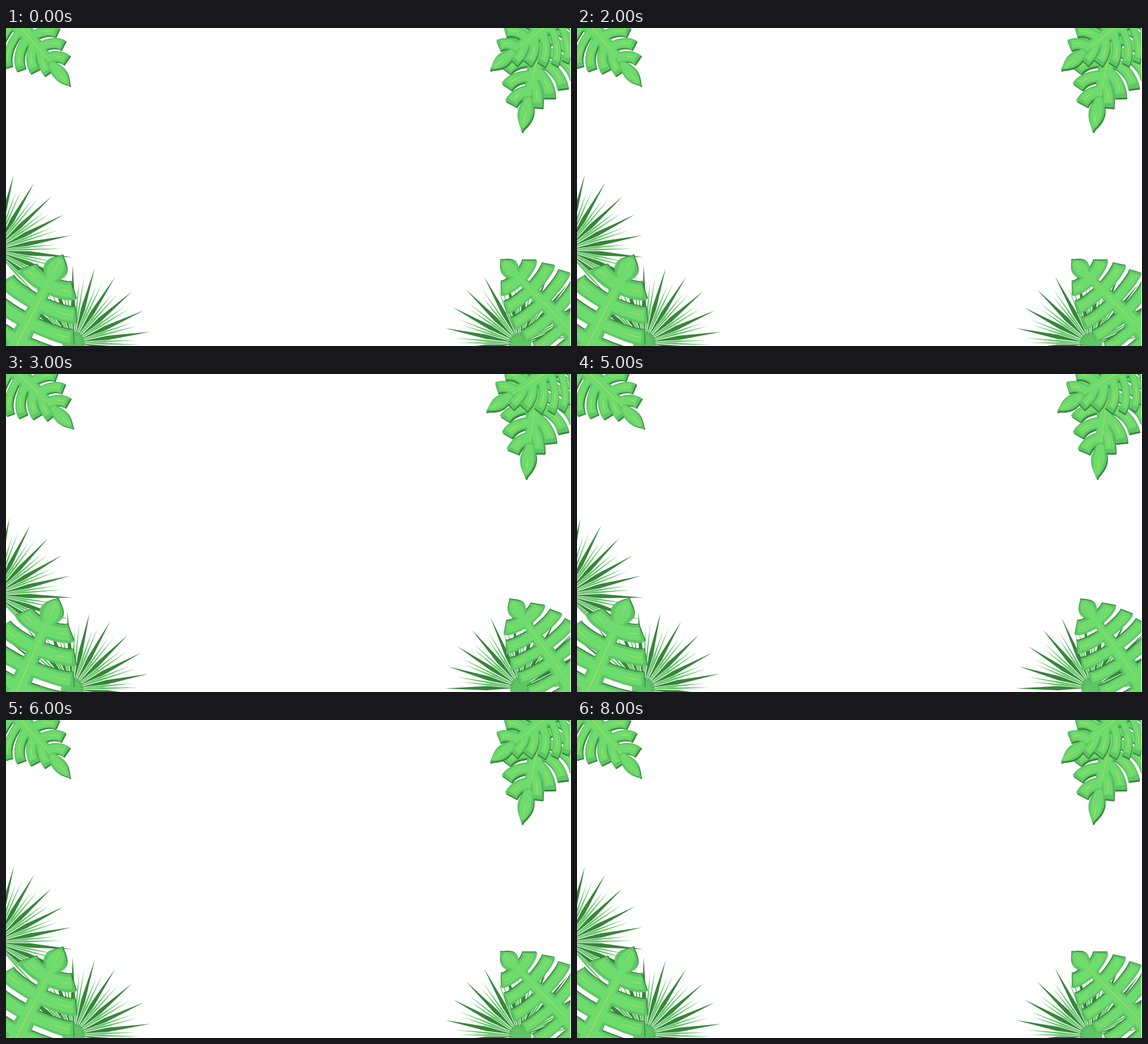
Write an HTML page that moves like this. It is 998 px wide and 561 px high and loops after 9 s.

```html
<!DOCTYPE html>
<html lang="en">
<head>
<meta charset="utf-8">
<title>Tropical leaves</title>
<style>
html, body { margin: 0; width: 100%; height: 100%; overflow: hidden; background: #fff; }
svg { display: block; width: 997px; height: 561px; }
</style>
</head>
<body>
<svg id="stage" viewBox="0 0 997 561"></svg>
<script>
const DARK = '#37863a', MID = '#5fc665', LIGHT = '#6ddb6d', VEIN = '#a8db62';
const stage = document.getElementById('stage');
const swaying = [];

const poly = pts => 'M' + pts.map(p => p.map(v => v.toFixed(1)).join(' ')).join('L') + 'Z';
const path = (d, fill, outline = 0) =>
  `<path d="${d}" fill="${fill}" stroke="${fill}" stroke-width="${outline}" stroke-linejoin="round"/>`;

// Each plant swings between rest and a turn of `angle` degrees about its pivot.
function plant(markup, angle, px, py) {
  const g = document.createElementNS('http://www.w3.org/2000/svg', 'g');
  g.innerHTML = markup;
  stage.append(g);
  swaying.push({ g, turn: `rotate(${angle} ${px} ${py})` });
}

// A band along a quadratic curve a-b-c, with half widths w0 to w1 and a bulge between.
function band({ a, b, c, w0, w1, bulge = 0 }, width, from = 0, to = 1) {
  const left = [], right = [], n = 14;
  for (let i = 0; i <= n; i++) {
    const t = from + (to - from) * i / n, u = 1 - t;
    const [x, y] = [0, 1].map(k => u * u * a[k] + 2 * u * t * b[k] + t * t * c[k]);
    const [dx, dy] = [0, 1].map(k => u * (b[k] - a[k]) + t * (c[k] - b[k]));
    const w = width(t, u * w0 + t * w1 + bulge * Math.sin(Math.PI * t)) / Math.hypot(dx, dy);
    left.push([x - dy * w, y + dx * w]);
    right.unshift([x + dy * w, y - dx * w]);
  }
  return poly(left.concat(right));
}

// Leaf kinds. Distances run from the leaf tip back along the midrib;
// each side widens as a power of a sine and is cut into evenly spaced lobes.
const half = { width: 86, reach: 150, power: 0.85, first: 46, step: 37, sweep: 12, count: 6 };
const BROAD = { bulge: 18, sides: [half, half] };
const SLIM = {
  bulge: 9,
  sides: [
    { width: 70, reach: 120, power: 2.3, first: 41, step: 18, sweep: 36, count: 7 },
    { width: 44, reach: 100, power: 1, first: 38, step: 24, sweep: 24, count: 5 }
  ]
};

function sideLobes({ width, reach, power, first, step, sweep, count }, sign) {
  const edge = d => width * Math.sin(Math.PI / 2 * Math.min(1, d / reach)) ** power;
  return Array.from({ length: count }, (_, i) => {
    const d = first + step * i, y = edge(d) * sign;
    const w = 0.38 * Math.hypot(step, edge(d + step) - edge(d));
    return { a: [d + sweep, 0], b: [d + sweep * 0.75, y * 0.8], c: [d, y], w0: w * 0.9, w1: w };
  });
}

function monstera(kind, x, y, angle, scale, flip, shadowX, shadowY) {
  const lobes = [
    { a: [260, 0], b: [140, 0], c: [42, 0], w0: 26, w1: 7 },
    { a: [50, 0], b: [25, 0], c: [0, 0], w0: 6, w1: 0, bulge: kind.bulge },
    ...sideLobes(kind.sides[0], 1),
    ...sideLobes(kind.sides[1], -1)
  ];
  const full = lobes.map(l => band(l, (t, w) => Math.max(w - 1, 0.3))).join('');
  const inner = lobes.map(l => band(l, (t, w) => w * 0.62, 0, 0.88)).join('');
  const veins = lobes.map((l, i) => {
    const from = i ? 0.38 : 0, to = i ? 0.85 : 1;
    return band(l, t => 0.2 + 0.7 * Math.sin(Math.PI * (t - from) / (to - from)), from, to);
  }).join('');
  const place = (dx, dy, art) =>
    `<g transform="translate(${x + dx} ${y + dy}) rotate(${angle}) scale(${scale} ${scale * flip})">${art}</g>`;
  return place(shadowX, shadowY, path(full, DARK, 2)) +
    place(0, 0, path(full, MID, 2) + path(inner, LIGHT, 2) + path(veins, VEIN));
}

// A fan of evenly spaced dark blades with two thin light ones in each gap.
function palm(cx, cy, first, step, count, length) {
  const blade = (deg, tip, belly, w, root) => {
    const a = deg * Math.PI / 180, s = Math.sin(a), c = Math.cos(a);
    const at = (r, o) => [cx + s * r + c * o, cy - c * r + s * o];
    return poly([at(root, 0), at(belly, -w), at(tip, 0), at(belly, w)]);
  };
  let light = '', dark = '';
  for (let i = 0; i < count; i++) {
    const a = first + step * i;
    dark += blade(a, length, length * 0.45, 3.8, 12);
    light += blade(a + step * 0.36, length * 0.8, length * 0.4, 1.6, 0);
    light += blade(a + step * 0.6, length * 0.86, length * 0.4, 1.6, 0);
  }
  return path(light, MID) + `<circle cx="${cx}" cy="${cy}" r="20" fill="${MID}"/>` + path(dark, DARK);
}

plant(palm(-20, 392, -2, 16.2, 9, 138), -3.1, -66, 400);
plant(palm(119, 555, -66.5, 16.5, 11, 137), -3.2, 130, 590);
plant(palm(908, 557, -95, 16.7, 11, 135), 4.6, 948, 582);

plant(monstera(BROAD, 99, 402, 117, 1, 1, 1.5, -1.5), -3.2, 5, 544);
plant(monstera(BROAD, 875, 410, 45, 0.78, 1, -1, -1.7), 9.8, 950, 495);
plant(monstera(SLIM, 112, 101, -130, 1, -1, 2, 2), -4.6, 42, 32);
plant(monstera(SLIM, 911, 181, -78, 1.15, 1, 1.5, 3), -4.6, 937, 97);
plant(monstera(SLIM, 856, 73, -38, 1, 1, 0.5, 3), 5.2, 941, -5);

const start = performance.now();
function frame() {
  const second = Math.floor((performance.now() - start) % 9000 / 1000);
  for (const { g, turn } of swaying) g.setAttribute('transform', second % 2 ? turn : '');
  requestAnimationFrame(frame);
}
frame();
</script>
</body>
</html>
```
